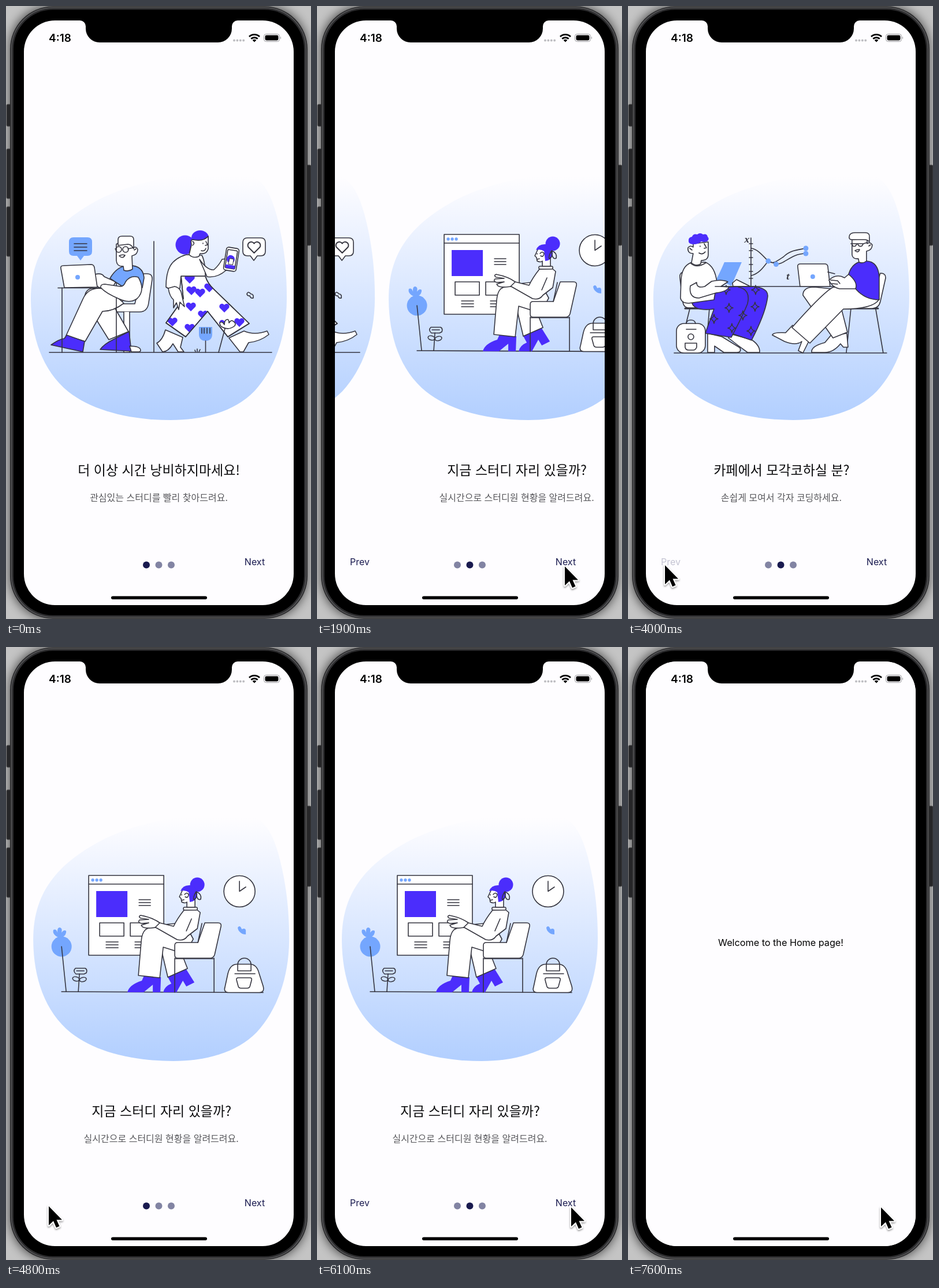
These frames come from a looping animation (528 by 1060 pixels, 8000 ms). An HTML page:

```html
<!DOCTYPE html>
<html lang="ko">
<head>
<meta charset="utf-8">
<title>Onboarding</title>
<style>
html, body { margin: 0; width: 100%; height: 100%; overflow: hidden; background: #bbb; }
svg { display: block; width: 528px; height: 1060px; }
text { font-family: Inter, Roboto, sans-serif; font-size: 16px; text-anchor: middle; }
.title, .sub { font-family: "Noto Sans CJK KR", "Noto Sans CJK", sans-serif; }
.title { font-size: 23px; fill: #0c0c0e; }
.sub { font-size: 16px; fill: #58585c; }
.nav { fill: #1a1b50; }
.art { fill: #fff; stroke: #35353f; stroke-width: 1.6; stroke-linejoin: round; stroke-linecap: round; }
.n { fill: none; }
.p { fill: #4b2dfc; }
.b { fill: #74a6fe; }
.flat { stroke: none; }
.k { fill: #35353f; stroke: none; }
</style>
</head>
<body>
<svg viewBox="0 0 528 1060">
<defs>
  <linearGradient id="sky" gradientUnits="userSpaceOnUse" x1="0" y1="295" x2="0" y2="716">
    <stop stop-color="#fefdff"/><stop offset="1" stop-color="#b2cfff"/>
  </linearGradient>
  <linearGradient id="pill"><stop stop-color="#84b0f7"/><stop offset="1" stop-color="#14204f"/></linearGradient>
  <filter id="blur"><feGaussianBlur stdDeviation="9"/></filter>
  <filter id="drop" x="-50%" y="-50%" width="200%" height="200%">
    <feDropShadow dx="0" dy="2" stdDeviation="1.6" flood-opacity=".4"/>
  </filter>
  <clipPath id="screen"><rect x="31" y="25" width="467" height="1011" rx="54"/></clipPath>
  <path id="trousers" d="M303 467H345Q349 480 360 490L421 549 384 572 349 528 311 572 277 548 307 506Z"/>
  <clipPath id="cut"><use href="#trousers"/></clipPath>
  <path id="heart" d="M0 8L-8 0A4.6 4.6 0 0 1 0 -5A4.6 4.6 0 0 1 8 0Z"/>
  <path id="star" d="M0-8Q1-1 7 0Q1 1 0 8Q-1 1-7 0Q-1-1 0-8Z"/>
  <path id="blob" fill="url(#sky)" d="M43 505C43 420 90 370 170 330C240 298 330 285 400 288C440 290 455 315 468 360C480 405 486 450 486 505C486 570 465 628 430 666C395 702 340 716 285 716C215 716 150 700 108 667C62 630 43 570 43 505Z"/>
</defs>

<!-- phone body -->
<rect width="528" height="1060" fill="#c4c4c4"/>
<rect x="7" width="514" height="1060" rx="72" opacity=".65" filter="url(#blur)"/>
<g fill="#262628" stroke="#4a4a4c">
  <rect x="1" y="170" width="9" height="38" rx="2"/>
  <rect x="1" y="247" width="9" height="86" rx="2"/>
  <rect x="1" y="347" width="9" height="86" rx="2"/>
  <rect x="519" y="275" width="9" height="139" rx="2"/>
</g>
<rect x="7" y=".5" width="515" height="1059" rx="74" fill="#2c2c2e"/>
<rect x="9.5" y="3" width="510" height="1054" rx="72" fill="none" stroke="#58585a" stroke-width="1.5"/>
<rect x="13" y="6.500" width="503" height="1047" rx="68"/>

<g clip-path="url(#screen)">
  <rect x="31" y="25" width="467" height="1011" fill="#fefdff"/>
  <g id="pages">
    <g>
      <use href="#blob"/>
      <g class="art">
        <path class="n" d="M75 599H460M256 407V599"/>
        <path class="b flat" d="M117 400H141q8 0 8 8V424q0 8-8 8H135L129 440 123 432H117q-8 0-8-8V408q0-8 8-8Z"/>
        <path class="n" d="M118 411H140M118 417H140M118 423H140"/>
        <path d="M236 463h8q10 0 9 10l-6 40q-2 16-16 16h-46v-14h38Z"/>
        <path d="M204 529V599H214V529"/>
        <path class="p" d="M163 594q6-9 24-18l26-13 4 34Z"/>
        <path d="M214 588q18 0 19 7 0 3-3 3H217Z"/>
        <path d="M150 488C134 490 134 508 140 516L178 577 212 563 186 518 212 505Z"/>
        <path d="M180 492Q145 480 133 507L104 570 137 580 167 528Q186 528 204 514Z"/>
        <path class="p" d="M78 586q14-10 23-11l4-6 31 11-3 18Z"/>
        <path class="n" d="M90 487.500H170M97 487V599M191 468V599"/>
        <path d="M154 464q12-3 16 4l20 9-8 14q-20-1-27-9Z"/>
        <path class="b" d="M180 471Q192 450 210 449Q237 447 239 470L236 487 200 484Z"/>
        <path d="M229 469q13 22-2 37-12 9-30 1-24-10-33-20-1-6 7-6l27 4q6 0 9-8 8-12 22-8Z"/>
        <path d="M99 449L147 447q5 0 6 5L158 486 101 487 95 454q-1-5 4-5Z"/>
        <circle class="b flat" cx="124" cy="469" r="4"/>
        <path d="M191 412V440Q192 451 203 450L204 457Q212 460 219 455L218 432Q228 430 228 421Q226 415 219 418V408Q205 402 191 412Z"/>
        <path d="M194 414V404q0-6 7-6h14q6 0 6 6v16q-4-8-10-8Z"/>
        <path class="n" d="M191 420h-2M211 420l9-2M196 432q6 6 10-1-5-2-10 1M222 422l3-2"/>
        <circle class="n" cx="195" cy="421" r="5"/><circle class="n" cx="207" cy="421" r="5"/>

        <path d="M276 560L306 573 302 590l6 8h-10l-9-14q-8 14-18 14l-10-15q10-5 15-23Z"/>
        <path d="M386 574L412 562Q430 570 452 562L455 568Q440 580 420 582L411 598H405Z"/>
        <use href="#trousers"/>
        <g id="hearts" class="p flat" clip-path="url(#cut)"></g>
        <use href="#trousers" class="n"/>
        <path d="M312 430C285 438 277 455 277 486q8 6 24 2l2-21h42q0-25-6-36Z"/>
        <path d="M281 488q2 14 9 20v14l5-9 4 12 2-13 8 8-6-26q-4-8-11-9Z"/>
        <path d="M335 438q14 20 25 18 9-8 14-18l16-2 4 16-13 5q-16 14-33 11Z"/>
        <circle class="p flat" cx="310" cy="413" r="16.500"/>
        <ellipse class="p flat" cx="336" cy="401" rx="15" ry="13"/>
        <path d="M323 404Q342 408 350 398V420Q347 430 336 428L334 433Q324 437 317 430L321 413Q319 404 323 404Z"/>
        <path class="n" d="M338 423q6 2 8-4M346 407l3 6-4 1M323 407q5 3 0 7M341 410v1"/>
        <g transform="rotate(9 390 438)">
          <rect x="379" y="418" width="22" height="40" rx="4"/>
          <rect x="381.500" y="422" width="17" height="32" rx="2"/>
          <circle class="p flat" cx="389" cy="438" r="7"/>
          <path d="M387 437h7v10h-8Z" stroke-width="1"/>
          <path class="p flat" d="M382 448h16v6h-16Z"/>
        </g>
        <path d="M418 401H441q8 0 8 8V424q0 8-8 8H435L429 440 423 432H418q-8 0-8-8V409q0-8 8-8Z"/>
        <use href="#heart" class="n" transform="translate(429.500 417) scale(1.250)"/>
        <path class="n" d="M417 498q2-6 7 0 5 0 4 7-5 1-6-4-4 1-5-3M328 598l-1-3M331 598v-5M334 598l2-4"/>
        <path class="b flat" d="M334 555H357V567q0 12-11.500 12T334 567Z"/>
        <path class="n" d="M339 557v9M343 557v9M348 557v9M353 557v9M345.500 579V599M379 558L368 599"/>
        <path d="M370 548q4-4 8 3 0-9 6-9 2 1 2 6 4-6 7-3 6 3 3 8-10 8-20 3-6-2-6-8Z"/>
      </g>
      <text class="title" x="264.500" y="810.500">더 이상 시간 낭비하지마세요!</text>
      <text class="sub" x="264.500" y="856">관심있는 스터디를 빨리 찾아드려요.</text>
    </g>

    <g transform="translate(467)">
      <use href="#blob"/>
      <g class="art">
        <path d="M139 395H269V533H139Z"/>
        <path class="n" d="M139 410H269M226 437h20M226 442h20M226 447h20M169 510h21M169 515h21M169 520h21M219 510h21M219 515h21M219 520h21M158 477h42v23h-42ZM211 477h42v23h-42Z"/>
        <g class="b flat"><circle cx="146" cy="403" r="2.700"/><circle cx="153" cy="403" r="2.700"/><circle cx="160" cy="403" r="2.700"/></g>
        <path class="p flat" d="M152 422h54v45h-54Z"/>
        <circle class="b flat" cx="92" cy="518" r="17.500"/>
        <path class="b flat" d="M88 503q-13-6-10-14 5-2 7 5-1-9 4-9 5 1 3 9 4-6 8-3 1 7-8 12Z"/>
        <path class="n" d="M92 518L100 596M123 565L121 596M92 596L441 597.500M116 555.500h17q4 2 2 8l-4 2h-14q-6-5-1-10ZM118 560h13"/>
        <ellipse class="n" cx="117" cy="574" rx="6" ry="3.600" transform="rotate(15 117 574)"/>
        <ellipse class="n" cx="129" cy="575" rx="6" ry="3.600" transform="rotate(-15 129 575)"/>
        <path class="p flat" d="M268 597q2-10 14-15l-7-13 32-13 15 24-14 7-6-10-11 20Z"/>
        <path class="p flat" d="M206 597q3-13 25-20l4-9 29 3-1 26h-13v-13l-16 13Z"/>
        <path d="M262 512L276 571 310 556 296 520Z"/>
        <path d="M305 477Q250 480 237 489Q231 495 230 508L225 568 262 572 268 519 306 531 320 505Z"/>
        <path d="M340 477H363q6 0 5 6L357 532q-2 6-7 6H293q-5 0-5-5V516q0-5 5-5H328Z"/>
        <path class="n" d="M328 511L335 478M288 538V597M356 538V597M288 539H356"/>
        <path d="M304 455Q292 470 286 483L262 477Q250 468 229 464Q224 466 229 469L243 471 227 472Q223 476 230 478L243 477 230 481Q232 487 246 486L255 485 292 506Q304 509 310 500L327 487 332 459 326 454Z"/>
        <path class="n" d="M317 470L308 491M262 477L254 485"/>
        <rect x="303" y="450" width="24" height="5" rx="2"/>
        <circle class="p flat" cx="327" cy="411" r="12.500"/>
        <path d="M303 417L296 432 299 435 300 441Q306 444 309 441V450H323V425Z"/>
        <path class="p flat" d="M298 422Q302 411 315 412Q328 414 327 429Q325 440 314 441L312 424Q306 420 298 422Z"/>
        <path class="n" d="M300 428v1M300 438l4-1M305 428q4-5 7 0-1 7-6 4M325 423q-6 10-4 14 7-3 4-14 10 4 8 13-7 4-8-13"/>
        <circle cx="400" cy="422.500" r="27"/>
        <path class="n" d="M400 405V422.500L411 415"/>
        <path class="b flat" d="M397 485q4-5 7 3 6-3 7 2v7q-6 0-9-3-5-4-5-9Z"/>
        <path d="M381 597.500c-6 0-8-4-6-10l5-23q4-16 16-16h22q12 0 16 16l7 22q3 11-7 11Z"/>
        <path class="n" d="M397 560V549a11.500 11 0 0 1 23 0V560ZM392 565H427M398 572h20q4 0 3 4l-3 11q-1 3-5 3h-10q-4 0-5-3l-3-11q-1-4 3-4Z"/>
      </g>
      <text class="title" x="265" y="810.500">지금 스터디 자리 있을까?</text>
      <text class="sub" x="264.500" y="856">실시간으로 스터디원 현황을 알려드려요.</text>
    </g>

    <g transform="translate(934)">
      <use href="#blob"/>
      <g class="art">
        <path d="M97 460q-9 0-8 10l5 42q2 10 10 10h20Z"/>
        <path class="n" d="M79 600H447M106 524L99 552M140 524L137 560M385 524L377 600M428 524L441 600"/>
        <path class="n" stroke-width="3" d="M98 523H150M371 523H432"/>
        <path d="M137 566L162 572 193 591Q196 599 188 599H165L149 588V599H137Z"/>
        <path d="M180 568L213 577Q228 587 227 599H206Q188 586 173 574Z"/>
        <path class="p" d="M110 514Q150 500 160 487Q175 485 215 485Q242 487 241 502Q238 530 213 578L181 567 178 573 133 566 148 524Q115 528 110 514Z"/>
        <path class="n" d="M180 569Q198 535 206 515Q212 490 190 486"/>
        <g id="stars" class="n"></g>
        <path class="b flat" d="M166 443H196L178 484Q160 474 150 476Q158 462 166 443Z"/>
        <path d="M108 444Q92 450 91 475L90 505Q92 514 104 514L148 508 153 478Q150 450 133 443Z"/>
        <path d="M118 478Q118 489 132 485L144 476Q162 472 172 477L160 485 174 486Q170 494 152 496L122 505Q104 505 107 484Z"/>
        <path d="M180 479l7-6 24 12h-30Z"/>
        <path class="n" d="M107 444Q117 455 134 444"/>
        <path d="M112 411L138 408V430Q138 440 126 440L125 446Q116 451 109 444L112 428Q102 428 103 418Q107 413 112 417Z"/>
        <path class="n" d="M122 427q6 4 11-2M131 411l4 7-4 1M106 419l4 3M124 415v1"/>
        <path class="p flat" d="M112 412q-9 0-8-7 0-5 6-6 2-6 9-4 5-4 10 0 7-2 8 4 4 4-1 8-6 2-10 0-4 5-14 5Z"/>
        <rect x="83" y="549" width="50" height="51" rx="13"/>
        <path class="n" d="M100 549q1-6 8-6t8 6M100 559H117M98 583h20v7q-2 5-6 5h-8q-5 0-6-5Z"/>
        <circle class="n" cx="108" cy="572" r="5"/>
        <path class="n" d="M212 401V485M209 411h6M209 423h6M209 435h6M209 447h6M209 459h6M209 471h6M213 419C225 421 234 434 242 441S258 440 268 434C280 422 292 422 307 419M213 466C228 462 235 449 242 441L255 446C270 448 280 428 307 428"/>
        <g class="b flat"><circle cx="242" cy="441" r="4.500"/><circle cx="255.500" cy="446.500" r="4.500"/><circle cx="307" cy="419" r="4.500"/><circle cx="307" cy="428" r="4.500"/></g>
        <g class="k" font-style="italic" font-weight="700"><text x="205" y="409" style="font:italic 700 15px 'Noto Serif',serif">x</text><text x="276" y="473" style="font:italic 700 15px 'Noto Serif',serif">t</text></g>
        <path d="M436 462q10 0 9 9l-9 40q-3 12-14 12h-40l40-20Z"/>
        <path d="M378 566L380 590H372L367 584Q355 599 340 599H317Q316 588 340 582L350 570Z"/>
        <path d="M302 500Q302 486 322 486L360 490 379 564 354 574Z"/>
        <path d="M284 552L312 580 302 600 294 596 300 580Q290 588 270 580L249 569Q250 564 272 565Z"/>
        <path d="M385 487L355 486Q340 492 283 556L314 583 372 524Q424 524 434 507L425 480Z"/>
        <path class="n" d="M150 485H365"/>
        <path d="M298 446H340q4 0 5 4l4 35H297l-4-34q-1-5 5-5Z"/>
        <circle class="b flat" cx="319" cy="468" r="4"/>
        <path class="p" d="M381 464Q388 440 412 441Q432 442 434 468V508Q410 508 394 490Z"/>
        <path d="M381 464Q398 478 393 489L365 489Q352 486 347 474Q360 462 374 470Z"/>
        <path class="n" d="M350 474l12 1 4 5M352 480l10 1M345 460l12 3"/>
        <path d="M387 404V430Q388 438 398 437L399 443Q406 446 412 441L412 424Q422 422 422 413Q418 407 413 411V402Z"/>
        <path d="M382 400q0-8 10-8h18q8 0 7 8v8q-3-4-8-4h-22q-5 0-5-4Z"/>
        <path class="n" d="M385 411H407L413 409M387 412q1 5 6 3l2-3M397 412q2 5 7 3l2-3M392 423q6 5 8-2-4 0-8 2M416 415l3-2"/>
      </g>
      <text class="title" x="265" y="810.500">카페에서 모각코하실 분?</text>
      <text class="sub" x="264.500" y="856">손쉽게 모여서 각자 코딩하세요.</text>
    </g>
  </g>

  <text id="prev" class="nav" x="74" y="967">Prev</text>
  <g id="right">
    <text id="next" class="nav" x="430.500" y="967">Next</text>
    <g id="done">
      <rect x="360" y="938" width="148" height="44.500" rx="22" fill="url(#pill)"/>
      <text x="434.500" y="966" fill="#fff">Done</text>
    </g>
  </g>
  <g id="dots"><circle cx="243" cy="966.500" r="6"/><circle cx="264.500" cy="966.500" r="6"/><circle cx="286" cy="966.500" r="6"/></g>

  <g id="home">
    <rect x="31" y="25" width="467" height="1011" fill="#fefdff"/>
    <text x="264.500" y="516.500" style="font-size:16.200px">Welcome to the Home page!</text>
  </g>

  <!-- status bar -->
  <path d="M128 24H401v1a10 10 0 0 0-10 10v4a24 24 0 0 1-24 24H162a24 24 0 0 1-24-24v-4a10 10 0 0 0-10-10Z"/>
  <text x="93.500" y="62" style="font-size:19px;font-weight:600">4:18</text>
  <path d="M395 59.500h18" stroke="#bebec2" stroke-width="4" stroke-linecap="round" stroke-dasharray="0 5.400"/>
  <path d="M421 53a13 13 0 0 1 18 0M424.300 56.800a8.200 8.200 0 0 1 11.400 0" fill="none" stroke="#000" stroke-width="2.800"/>
  <path d="M430 62.500l-3.300-3.400a4.700 4.700 0 0 1 6.600 0Z"/>
  <rect x="446.500" y="48.500" width="27" height="13" rx="4" fill="none" stroke="#98989c"/>
  <rect x="448.500" y="50.500" width="23" height="9" rx="2.400"/>
  <path d="M475 52.500q2 2.500 0 5Z" fill="#98989c"/>
  <rect x="182" y="1020.500" width="166" height="5.500" rx="2.750"/>
</g>
<path id="cursor" filter="url(#drop)" stroke="#fff" stroke-width="4" stroke-linejoin="round" paint-order="stroke" d="M1 2V35L9 27.500 14 39 19.500 36.500 14.500 25.500H24Z"/>
</svg>

<script>
const $ = id => document.getElementById(id);
const clamp = x => Math.max(0, Math.min(1, x));
const smooth = x => x * x * (3 - 2 * x);
const scatter = (id, shape, spots) => $(id).innerHTML =
  spots.map(([x, y]) => `<use href="#${shape}" transform="translate(${x} ${y})"/>`).join('');

scatter('hearts', 'heart', [[318,472],[321,492],[336,496],[320,520],[288,546],[352,487],[378,522],[318,557],[404,547],[378,550],[341,534]]);
scatter('stars', 'star', [[169,491],[174,522],[148,541],[179,557],[198,535],[219,520],[212,562],[220,491]]);

const LOOP = 8000, SLIDE = 350, PAGE = 467;
const taps = [[1589, 1], [2853, 1], [3990, -1], [4776, -1], [5600, 1], [6250, 1], [7150, 0]];
const path = [[560, 458, 1068], [880, 429, 969], [1300, 428, 967], [3300, 428, 967], [3800, 63, 965], [4150, 63, 965],
  [4500, 73, 965], [4950, 73, 965], [5500, 439, 967], [7000, 439, 967], [7200, 437, 967]];

// cubic-bezier(.42, 0, 1, 1)
function easeIn(x) {
  let lo = 0, hi = 1;
  for (let i = 0; i < 20; i++) {
    const s = (lo + hi) / 2, r = 1 - s;
    if (1.26 * s * r * r + 3 * s * s * r + s * s * s < x) lo = s; else hi = s;
  }
  return smooth(lo);
}

// A tapped button dims, then recovers
function dim(d) {
  const low = d < 0 ? clamp((d + 90) / 90) : 1 - clamp((d - 50) / 180);
  return 1 - .75 * low;
}

function cursorAt(t) {
  const i = path.findIndex(p => p[0] > t);
  if (i < 0) return path[path.length - 1].slice(1);
  if (!i) return path[0].slice(1);
  const [a, b] = [path[i - 1], path[i]], u = smooth((t - a[0]) / (b[0] - a[0]));
  return [a[1] + (b[1] - a[1]) * u, a[2] + (b[2] - a[2]) * u];
}

function draw(t) {
  let page = 0, scroll = 0, left = 1, right = 1;
  for (const [at, step] of taps) {
    if (t >= at) page += step;
    scroll += step * easeIn(clamp((t - at) / SLIDE));
    if (step < 0) left = Math.min(left, dim(t - at));
    else right = Math.min(right, dim(t - at));
  }
  $('pages').setAttribute('transform', `translate(${-PAGE * scroll})`);
  $('prev').setAttribute('opacity', page ? left : 0);
  $('right').setAttribute('opacity', right);
  $('next').setAttribute('opacity', page < 2 ? 1 : 0);
  $('done').setAttribute('opacity', page < 2 ? 0 : 1);
  [...$('dots').children].forEach((dot, i) => dot.setAttribute('fill', i === page ? '#191a4f' : '#8284a3'));
  $('home').setAttribute('opacity', clamp((t - 7250) / 250));
  $('cursor').setAttribute('transform', `translate(${cursorAt(t)})`);
}

function tick() {
  draw(performance.now() % LOOP);
  requestAnimationFrame(tick);
}
tick();
</script>
</body>
</html>
```
